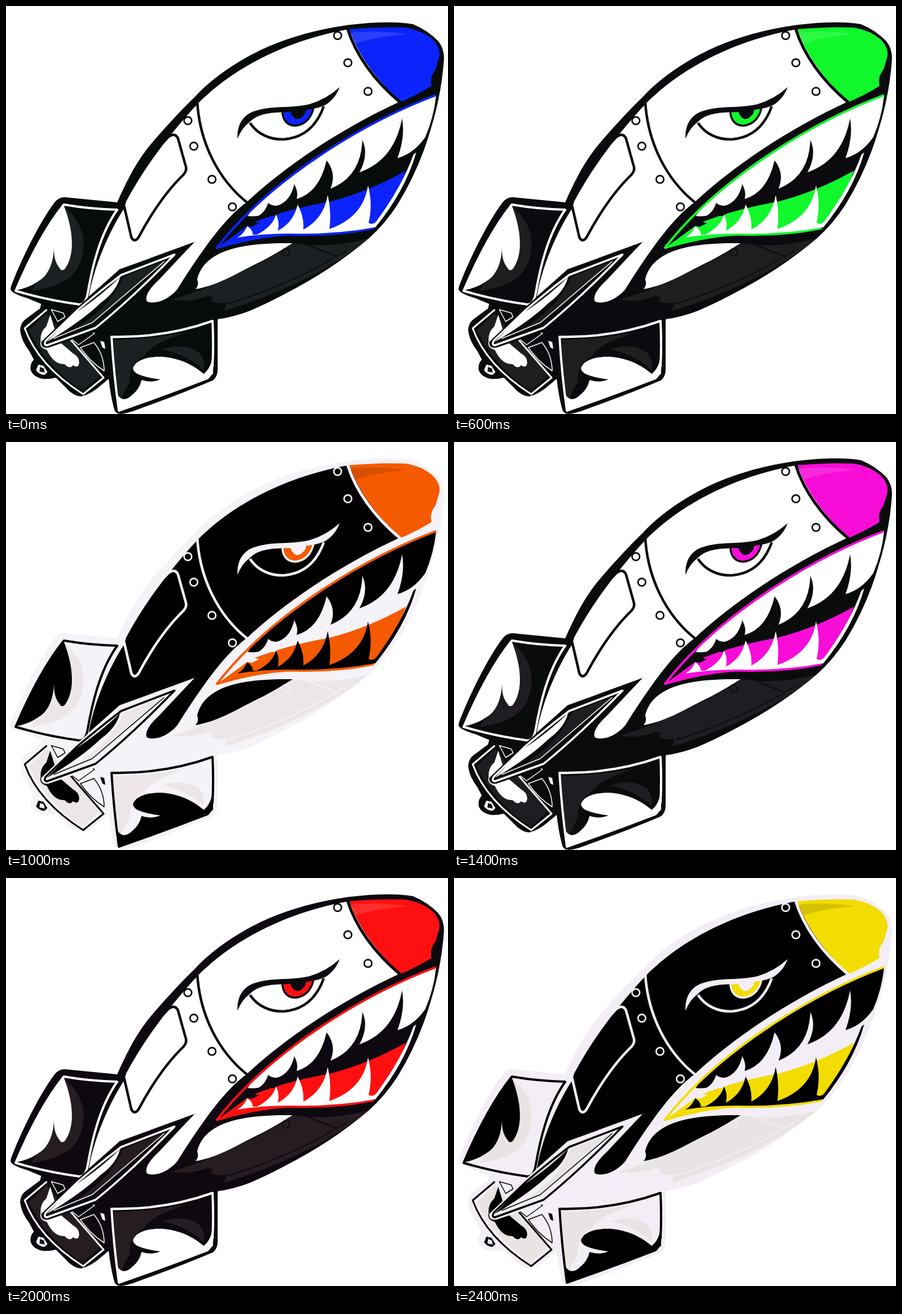
Animation of 779 by 719 pixels, one loop 2600 ms. Source, as an HTML page:

```html
<!DOCTYPE html>
<html lang="en">
<head>
<meta charset="utf-8">
<title>Shark rocket</title>
<style>
html, body { margin: 0; width: 100%; height: 100%; overflow: hidden; background: #fff; }
svg { display: block; width: 779px; height: 719px; animation: flash 2600ms step-end infinite; }

/* --hue accent, --ink outline, --shade soft shadow, --paper body */
@keyframes flash {
  0%       { --hue: #0c24fb; --ink: #070c0b; --shade: #1b2122; --paper: #fff; }
  7.6923%  { --hue: #0cd0fb; --ink: #0b0a0b; --shade: #1e2120; --paper: #fff; }
  15.3846% { --hue: #00f559; --ink: #f5f0ef; --shade: #e8ebe6; --paper: #000; }
  23.0769% { --hue: #10f82c; --ink: #0d0a0f; --shade: #1d1f1e; --paper: #fff; }
  30.7692% { --hue: #78ff0e; --ink: #100b0c; --shade: #1f1e18; --paper: #fff; }
  38.4615% { --hue: #f55a00; --ink: #f5f2f8; --shade: #ece6e8; --paper: #000; }
  46.1538% { --hue: #f5003c; --ink: #f3f3f5; --shade: #e9e5e8; --paper: #000; }
  53.8462% { --hue: #f80cd8; --ink: #0a0c0c; --shade: #201d22; --paper: #fff; }
  61.5385% { --hue: #8a00f5; --ink: #f0f5f3; --shade: #e3e2e9; --paper: #000; }
  69.2308% { --hue: #e600f5; --ink: #f2f4f3; --shade: #e7e3e8; --paper: #000; }
  76.9231% { --hue: #ff1010; --ink: #0e0810; --shade: #261d22; --paper: #fff; }
  84.6154% { --hue: #ff8a0e; --ink: #0d0a0e; --shade: #231f1e; --paper: #fff; }
  92.3077%, 100% { --hue: #f3dc00; --ink: #f3eef5; --shade: #e8e4e3; --paper: #000; }
}

.ink { fill: var(--ink); }
.paper { fill: var(--paper); }
.hue { fill: var(--hue); }
.shade { fill: var(--shade); }
.line { fill: none; stroke: var(--ink); stroke-width: 4.5; stroke-linejoin: round; }
.edge { fill: none; stroke: var(--paper); stroke-width: 4; stroke-linejoin: round; }
.rim { fill: none; stroke: var(--hue); stroke-width: 4; }
.rivets { stroke-width: 2.7; }
.thin { stroke-width: 2; }
.hair { stroke-width: 1.5; }
</style>
</head>
<body>
<svg viewBox="0 0 779 719">
  <!-- silhouette -->
  <path class="ink" d="M196 346C212 310 228 277 254 245C277 218 304 188 333 160C362 128 405 99 450 77C515 47 590 31 660 29Q692 28 717 32Q742 42 762 62Q772 75 772 92Q768 155 748 219Q728 288 690 350Q668 384 640 409Q585 456 520 492Q470 520 430 537Q402 548 373 552L373 640Q373 654 364 660Q310 683 240 708Q215 718 202 719Q192 719 190 708Q184 685 181 657L169 667Q150 684 133 688Q123 688 112 679L88 655Q75 658 64 657Q48 653 44 643Q41 632 49 623L41 608Q27 590 25 572Q25 560 33 553L60 533L62 525L38 515Q11 507 8 500Q8 495 12 486C30 440 62 377 85 347Q93 336 104 337Z"/>

  <!-- hull -->
  <path class="paper" d="M212 344C246 280 292 222 338 172C400 110 490 62 603 41L693 169C600 212 500 275 425 345C387 373 352 420 302 499C286 518 264 526 249 521C243 514 253 497 268 484L332 416L200 465L146 512C154 465 178 403 208 357Z"/>
  <path class="hue" d="M605 41Q660 36 705 38Q733 43 751 58Q766 73 764 88L757 112Q746 125 750 141Q724 157 696 169C650 128 620 84 605 41Z"/>
  <path class="paper" opacity=".12" d="M607 47Q660 42 706 50Q650 54 614 67Z"/>
  <path class="line" d="M337 168C341 238 372 305 427 348"/>
  <path class="line" style="stroke-width:5" d="M602 40C616 85 648 131 695 170"/>
  <path class="line" d="M286 231Q297 222 303 233L317 283Q319 290 313 297C285 324 257 364 234 407Q227 418 221 408L208 352Q207 347 210 341C226 306 255 262 286 231Z"/>
  <g class="line rivets">
    <circle cx="584.5" cy="52" r="6.7"/>
    <circle cx="602.5" cy="100" r="6.7"/>
    <circle cx="638" cy="150.5" r="6.7"/>
    <circle cx="320.5" cy="202" r="6.7"/>
    <circle cx="331" cy="247" r="6.7"/>
    <circle cx="363" cy="305.5" r="6.7"/>
    <circle cx="399" cy="354" r="6.7"/>
  </g>

  <!-- eye -->
  <path class="line" d="M430 206C443 226 466 236 490 235C526 232 548 210 560 177"/>
  <path class="hue" d="M487 187Q489 210 510 211Q535 208 541 180Z"/>
  <path class="line" style="stroke-width:3.5" d="M487 187Q489 210 510 211Q535 208 542 180"/>
  <path class="ink" d="M501 184L528 181Q530 189 523 194Q519 200 511 199Q502 194 501 184Z"/>
  <path class="ink" d="M408 234C407 211 416 192 439 185C470 175 500 181 535 173Q565 164 588 143Q580 165 560 176Q545 182 500 187C462 187 442 191 429 205Q416 214 408 234Z"/>

  <!-- belly -->
  <path class="shade" d="M292 517Q345 503 410 471Q465 447 507 418Q570 428 638 410C580 460 490 505 381 538Q391 529 386 522Q374 527 361 519Q368 512 356 511Q318 524 292 517Z"/>
  <path class="paper" d="M334 499Q341 491 337 482C347 442 388 416 505 418Q482 433 452 449C412 468 376 492 334 499Z"/>
  <g class="line thin">
    <circle cx="493" cy="434" r="6.5"/>
    <path d="M390 525Q500 492 600 431M525 418Q552 430 580 440"/>
  </g>

  <!-- mouth -->
  <path class="ink" d="M758 156C640 200 470 298 370 428Q440 405 500 403Q580 408 649 391Q700 320 722 258Z"/>
  <path class="hue" d="M705 290Q640 327 570 345Q490 359 430 384L370 428Q440 406 500 402Q580 405 647 392Q685 345 705 290Z"/>
  <path class="paper" d="M758 158C650 200 530 270 437 353L426 370Q445 372 449 367Q458 360 462 347Q472 355 483 350Q502 341 508 314Q516 329 512 340Q552 329 565 272Q583 294 572 322Q626 300 628 236Q640 262 623 293Q684 272 698 198Q704 230 690 268Q719 260 739 231Q754 196 758 158Z"/>
  <path class="ink" d="M415 382Q432 377 446 383L433 389Q420 386 405 393ZM456 370Q470 368 478 352Q488 363 474 370Z"/>
  <path class="paper" d="M408 408Q420 401 425 388Q435 394 435 403L442 403Q470 389 476 367Q483 383 479 396Q507 381 514 350Q526 372 524 394Q560 375 567 333Q574 364 570 393Q630 372 638 316Q647 350 639 382Q646 387 653 379Q698 318 718 262L723 258Q704 325 651 390Q580 403 500 401Q450 401 408 408Z"/>
  <path class="rim" d="M758 157C640 201 470 299 371 427"/>
  <path class="rim" style="stroke-width:3" d="M371 427Q440 406 500 403Q580 406 648 392"/>

  <!-- upper fin -->
  <path class="shade" d="M103 354C140 385 145 425 126 462Q108 494 45 502L88 430Z"/>
  <path class="paper" d="M102 352C118 393 123 437 104 463Q98 469 94 461Q83 448 85 423Q83 470 57 485Q40 497 17 501C40 450 68 396 102 352Z"/>
  <path class="edge" d="M102 350Q150 358 196 359C164 404 151 466 144 506Q141 525 130 526Q70 518 17 502C40 448 70 390 102 350Z"/>

  <!-- engine -->
  <path class="shade" d="M40 571L72 541L166 651L135 678Q70 635 40 571Z"/>
  <path class="paper" d="M78 544L71 565Q60 574 61 591Q58 602 72 606Q84 632 103 631Q113 641 118 633Q128 640 129 628Q129 618 118 612L92 590Z"/>
  <path class="edge" style="stroke-width:3" d="M72 535L33 568C49 612 84 651 136 684L172 655L112 586"/>
  <path class="ink" d="M112 582L145 566L170 590L174 645Q148 622 112 582Z"/>
  <path class="edge hair" d="M80 535L101 541L104 548L91 556ZM113 585L145 570L156 577L128 597ZM131 602L155 593Q173 615 173 643Q148 627 131 602Z"/>
  <path class="paper" d="M166 590L173 592L175 604L170 602ZM57 632L66 634L73 645L68 650Q59 650 53 642Z"/>
  <path class="ink" d="M60 636L67 639L68 646L59 644Z"/>

  <!-- side fin -->
  <path class="ink" d="M332 416L200 464L130 527L62 592Q61 604 75 602L158 574L230 522Z"/>
  <path class="shade" d="M207 477L279 449L154 559L112 575Q185 532 207 477Z"/>
  <path class="paper" d="M201 478Q195 503 166 524Q134 555 72 592L119 543Q165 513 201 478Z"/>
  <path class="edge" style="stroke-width:3.5" d="M297 438L203 474Q166 502 126 536L70 590Q66 597 72 598L158 567Q221 516 297 438Z"/>
  <path class="edge hair" d="M279 450L152 558L84 586"/>

  <!-- lower fin -->
  <path class="shade" d="M190 589Q255 587 316 576Q255 596 244 616Q216 632 218 662L199 700Q191 645 190 589Z"/>
  <path class="shade" d="M275 605Q318 592 342 612Q352 628 348 642Q320 614 275 605Z"/>
  <path class="paper" d="M224 637Q233 618 274 618C315 621 340 640 355 654Q276 686 200 712Q198 699 198 687Q208 700 224 684Q235 675 239 659Q256 665 272 658Q246 655 231 648Q223 643 224 637Z"/>
  <path class="edge" d="M186 583Q280 585 364 555Q366 600 364 634Q362 650 355 656Q275 687 199 713Q190 650 186 583Z"/>
  <path class="paper" d="M364 610Q364 638 346 650L355 657L365 648Z"/>
</svg>
</body>
</html>
```
